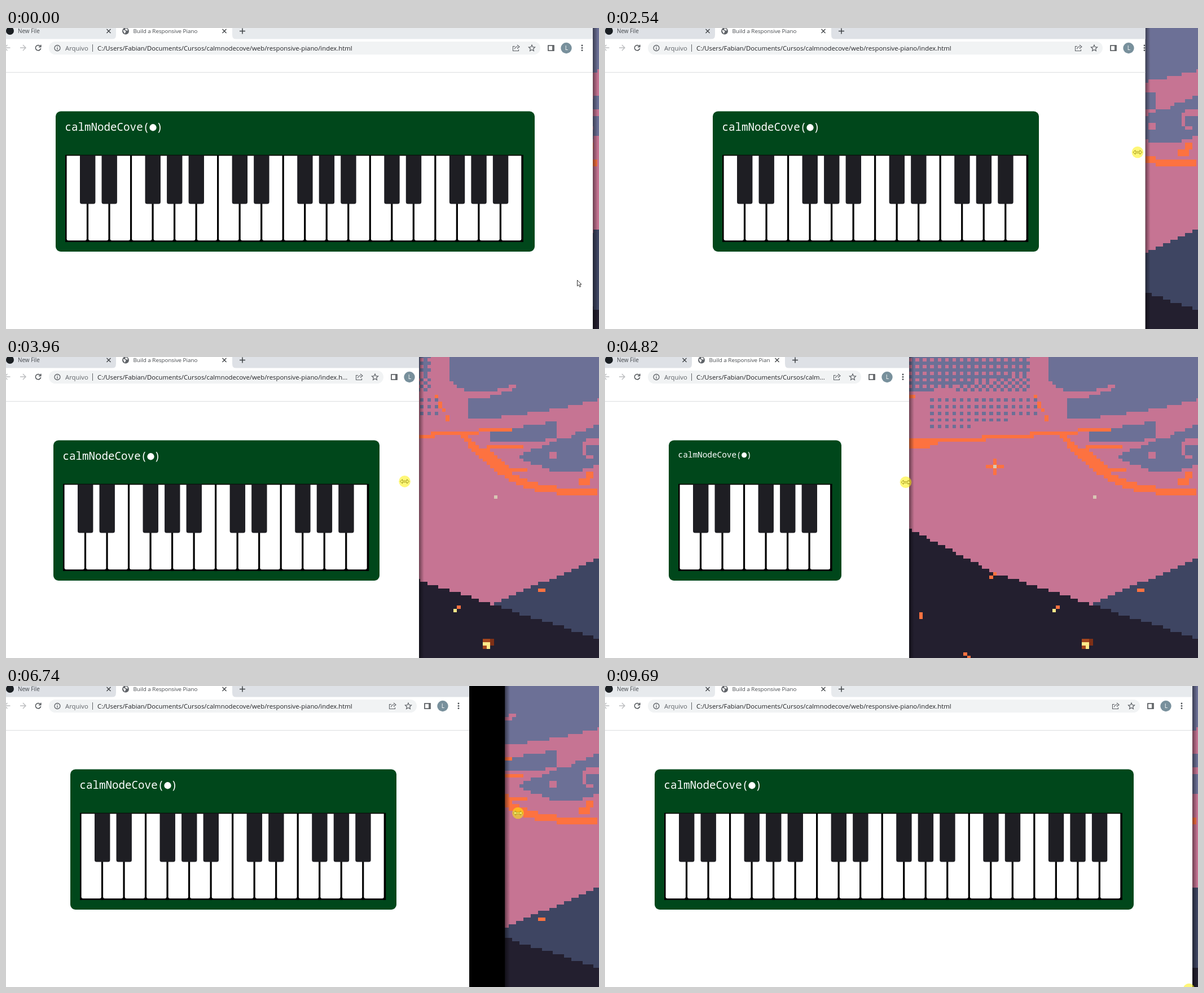
Write an HTML page with a canvas that moves like this. It is 1051x533 px and loops after 9.75 s.

```html
<!DOCTYPE html>
<html lang="en">
<head>
<meta charset="utf-8">
<title>Build a Responsive Piano</title>
<style>
html, body { margin: 0; width: 100%; height: 100%; overflow: hidden; background: #fff; }
canvas { display: block; }
</style>
</head>
<body>
<canvas id="stage" width="1051" height="533"></canvas>
<script>
const W = 1051, H = 533, LOOP = 9750;
const FOCUS = 1800, SHRUNK = 5280, GROWN = 7700, RELEASE = 8030, LEAVE = 8290, BLUR = 9690;
const SANS = '"Open Sans", "Noto Sans", sans-serif';
const MONO = '"Noto Sans Mono", "DejaVu Sans Mono", monospace';
const ADDRESS = 'C:/Users/Fabian/Documents/Cursos/calmnodecove/web/responsive-piano/index.html';
const ctx = document.getElementById('stage').getContext('2d');

// Motion: the pointer drags the window edge, edge and page follow with a delay
const DRAG = [[FOCUS, 1040], [1950, 1025], [3160, 859], [3770, 755], [4590, 547], [4820, 533], [SHRUNK, 519],
  [5620, 521], [6140, 754], [6240, 792], [7260, 1027], [7640, 1041]];

function grip(t) {
  const i = DRAG.findIndex(([time]) => t < time);
  if (i === 0) return DRAG[0][1];
  if (i < 0) return DRAG[DRAG.length - 1][1];
  const [t0, a] = DRAG[i - 1], [t1, b] = DRAG[i];
  return a + (b - a) * (t - t0) / (t1 - t0);
}
const edgeAt = t => grip(t - 100);
const pageAt = t => Math.round(t > GROWN ? edgeAt(t) : grip(t - (t < SHRUNK ? 230 : 376)));

function ease(p) {
  p = Math.max(0, Math.min(1, p));
  return p * p * (3 - 2 * p);
}

function rect(c, x, y, w, h) {
  ctx.fillStyle = c;
  ctx.fillRect(x, y, w, h);
}
function round(c, x, y, w, h, r) {
  ctx.fillStyle = c;
  ctx.beginPath();
  ctx.roundRect(x, y, w, h, r);
  ctx.fill();
}
function disc(c, x, y, r) {
  ctx.fillStyle = c;
  ctx.beginPath();
  ctx.arc(x, y, r, 0, 7);
  ctx.fill();
}
function shape(d, x, y, line, w, fill) {
  const path = new Path2D(d);
  ctx.save();
  ctx.translate(x, y);
  if (fill) {
    ctx.fillStyle = fill;
    ctx.fill(path);
  }
  if (line) {
    ctx.strokeStyle = line;
    ctx.lineWidth = w;
    ctx.stroke(path);
  }
  ctx.restore();
}
function text(s, x, y, size, c, family = SANS) {
  ctx.font = `${size}px ${family}`;
  ctx.fillStyle = c;
  ctx.fillText(s, x, y);
}

function makeWallpaper() {
  const CW = 6.55, CH = 5.917, TOP = 2;
  const PINK = '#c67493', PURPLE = '#6c7096', ORANGE = '#fd7240', NAVY = '#3e4562', DARK = '#231f2f';
  const PALE = '#d8c7b4', YELLOW = '#fde98a';
  const el = document.createElement('canvas');
  el.width = W;
  el.height = H;
  const g = el.getContext('2d');

  const cell = (c, i, j, w = 1, h = 1) => {
    const x = Math.round(i * CW), y = Math.round(TOP + j * CH);
    g.fillStyle = c;
    g.fillRect(x, y, Math.round((i + w) * CW) - x, Math.round(TOP + (j + h) * CH) - y);
  };
  // Fills every cell whose centre passes the test
  const paint = (c, test) => {
    for (let j = -1; j * CH < H; j++) for (let i = 0; i * CW < W; i++) {
      if (test((i + .5) * CW, TOP + (j + .5) * CH, i, j)) cell(c, i, j);
    }
  };
  const past = (x, from) => Math.max(0, x - from);

  g.fillStyle = PINK;
  g.fillRect(0, 0, W, H);

  // Dithered sky: dense, checkered, sparse
  paint(PURPLE, (x, y, i, j) => {
    const even = i % 2 === 0 && j % 2 === 0;
    if (x < 755 && y < 64 - .17 * past(x, 550)) return !even;
    if (x > 620 && x < 755 && y < 63) return (i + j) % 2 === 0;
    return even && x > 574 && x < 768 && y > 68 && y < 127 - .2 * past(x, 635);
  });

  // Upper cloud with a pink streak
  paint(PURPLE, (x, y) => {
    const d = x - 860;
    const top = 62 - .016 * past(825, x) ** 2 - .3 * past(x, 860);
    const bottom = 75 - .33 * past(x, 845);
    const streak = x < 905 && y > top && y < bottom;
    return x > 786 && y < 107 - .08 * d - .00047 * d * d && !streak && !(x < 819 && y > 75);
  });

  // Lower cloud
  paint(PURPLE, (x, y) => {
    const d = x - 911;
    if (x < 860 || y < 133 - .165 * (x - 860)) return false;
    if (x < 976 && y < 152 - .07 * past(x, 885)) return true;
    return d > 0 && y > 172 - .37 * d && y < Math.min(203, 180 + .4 * d) - .3 * past(x, 1010);
  });
  cell(PINK, 150, 22, 4);
  cell(PINK, 152, 21, 1, 3);
  cell(PINK, 147, 28, 2, 2);
  cell(PINK, 157, 24, 4, 2);
  cell(PINK, 156, 25, 1, 4);
  cell(PINK, 157, 29, 2);

  // Sunlit rim
  paint(ORANGE, (x, y) => x < 900 && Math.abs(y - 153.5 + .0705 * (x - 537)) < (x < 582 ? 8 : 3.1));
  paint(ORANGE, (x, y) => {
    const low = 244 - 104 * ((W - x) / 245) ** 3.2;
    const thick = 12 + 20 * Math.exp(-(((x - 865) / 28) ** 2));
    return x > 806 && y < low && y > low - thick;
  });
  cell(ORANGE, 130, 26, 10);
  cell(ORANGE, 136, 33, 5);
  cell(ORANGE, 157, 34, 2, 2);
  cell(ORANGE, 155, 36, 3, 2);
  cell(ORANGE, 82, 11, 2);
  for (let k = 0; k < 4; k++) cell(ORANGE, 116 + k, 11 + 2 * k, 1, 1 + k % 2);

  // Star
  cell(ORANGE, 105, 30, 1, 5);
  cell(ORANGE, 103, 32, 5);
  cell(PALE, 105, 32);
  cell(PALE, 132, 41);

  // Hills
  paint(NAVY, (x, y) => y > 432 - .421 * (x - 873));
  paint(DARK, (x, y) => y > Math.min(303 + .516 * (x - 537), 382 + .325 * (x - 690)));

  // Sparks and lantern
  cell(ORANGE, 144, 69, 2);
  cell(ORANGE, 85, 76, 1, 2);
  for (const [i, j] of [[104, 65], [105, 64], [122, 74], [97, 88], [98, 89]]) cell(ORANGE, i, j);
  cell(YELLOW, 121, 75);
  cell('#a5471f', 129, 84, 2, 3);
  cell('#7f3016', 131, 84, 1, 2);
  cell(YELLOW, 129, 85, 2);
  cell(YELLOW, 130, 86);
  return el;
}
const wallpaper = makeWallpaper();

const cross = x => shape('M-3.5 -3.5L3.5 3.5M3.5 -3.5L-3.5 3.5', x, 5.5, '#3c4043', 1.3);

function tabs(page, focused) {
  const tw = Math.min(205, (page - 219) / 2), end = 2 * tw - 9;
  rect(focused ? '#dee1e6' : '#e7eaed', 0, 0, page, 19.5);
  shape(`M${tw - 17} 20Q${tw - 10} 20 ${tw - 10} 12V0H${end}V12Q${end} 20 ${end + 7} 20Z`, 0, 0, null, 0, '#fff');
  disc('#1b1f23', 7, 5, 7);
  text('New File', 21, 9, 9.95, '#45494d');
  cross(tw - 23);

  disc('#5f6368', tw + 7, 5.5, 6);
  shape('M-4.5 3.5l3 .5 2 2 -1 2 -1 2 -2 -3zM0 .5l3 1 1 3 -3 0 -2 -2z', tw + 7, 0, null, 0, '#fff');
  ctx.save();
  ctx.beginPath();
  ctx.rect(0, 0, end - 27, 20);
  ctx.clip();
  text('Build a Responsive Piano', tw + 20.5, 9, 9.8, '#45494d');
  ctx.restore();
  cross(end - 14);
  shape('M-5 0H5M0 -5V5', end + 18, 5.5, '#3c4043', 1.5);
}

function toolbar(page) {
  const INK = '#5f6368', DIM = '#babcbe', DEEP = '#4a4e52';
  shape('M-5 0H5M0 -5L-5 0L0 5', 2.5, 35, DIM, 1.4);
  shape('M-5 0H5M0 -5L5 0L0 5', 30, 35, DIM, 1.4);
  shape('M3.6 -3A4.7 4.7 0 1 0 4.7 1M4.8 -5.2V-1.4H1', 57, 35, DEEP, 1.5);

  round('#f1f3f4', 76, 24, page - 169, 23, 11.5);
  shape('M-5 0A5 5 0 1 1 5 0A5 5 0 1 1 -5 0M0 -.7V3M0 -3V-1.7', 91, 35.5, INK, 1.3);
  text('Arquivo', 105, 39.5, 11.35, INK);
  rect(INK, 153, 29, 1, 13);

  let s = ADDRESS;
  for (let n = s.length; ctx.measureText(s).width > page - 315 && n > 1; n--) s = ADDRESS.slice(0, n) + '...';
  text(s, 162, 39.5, 11.35, '#202124');

  shape('M-2 -3H-5.5V5H4.5V2.5M-2.5 2Q-2 -2.5 3 -2.5M2 -5.5L6 -2.3L2 1', page - 136, 35.5, INK, 1.1);
  shape('M0 -5.5L1.6 -1.8L5.5 -1.5L2.6 1.2L3.4 5L0 3L-3.4 5L-2.6 1.2L-5.5 -1.5L-1.6 -1.8Z', page - 108, 35.5, INK, 1.2);
  shape('M-5 -4.5H5V4.5H-5ZM3 -4.5V4.5', page - 74, 35.5, DEEP, 1.6);
  disc('#78909c', page - 47, 35.5, 9.7);
  text('L', page - 49.3, 39.3, 10.3, '#fff');
  for (let k = -1; k < 2; k++) disc(DEEP, page - 19, 35.3 + 4.3 * k, 1.4);
  rect('#dcdee0', 0, 78, page, 1);
}

function piano(page) {
  const PITCH = 38.52;
  const size = page > 1011 ? 3 : page > 642 ? 2 : 1;
  const width = [306, 578, 849][size - 1];
  const x = Math.floor((page - 15 - width) / 2);
  const kx = x + 17, count = size * 7;
  round('#00471b', x, 147.5, width, 248.5, 9);

  const em = size > 1 ? 19.2 : 14.4, adv = em * .6, base = size > 1 ? 182 : 178;
  text('calmNodeCove(', kx - .5, base, em, '#fff', MONO);
  text(')', kx + adv * 14, base, em, '#fff', MONO);
  disc('#fff', kx + adv * 13.5, base - em * .3, em * .32);

  rect('#000', kx, 224.7, count * PITCH + 3, 154.3);
  for (let i = 0; i < count; i++) round('#fff', kx + 2.6 + i * PITCH, 226.3, 35.3, 150, [0, 0, 3, 3]);
  for (let i = 0; i < count; i++) {
    if (i % 7 !== 2 && i % 7 !== 6) round('#1e1e23', kx + 26 + i * PITCH, 225.5, 27.4, 86, [0, 0, 3.5, 3.5]);
  }
}

function mouse(t) {
  const resizing = t >= 1410 && t < LEAVE;
  let x = grip(t), y = 219 + 7 * Math.min(1, Math.abs(t - 3160) / 4200);
  if (!resizing) {
    const leaving = t >= LEAVE;
    const p = ease(leaving ? (t - LEAVE) / 920 : (t - 70) / 880);
    const bow = Math.sin(Math.PI * p);
    x = leaving ? 1031 + 4 * p - 9 * bow : 1012 + 25 * p - 36 * bow;
    y = leaving ? 226 + 311 * p : 446 - 227 * p;
  }
  const glyph = resizing
    ? 'M-8 0L-4 -3.7V-1.2H4V-3.7L8 0L4 3.7V1.2H-4V3.7Z'
    : 'M.5 .5V11L3 8.7L4.8 12.6L6.6 11.8L4.9 8H8Z';
  shape(glyph, x, y, '#222', .9, '#fff');
  if (t >= FOCUS && t < RELEASE || t >= BLUR) disc('rgba(255,240,10,.55)', x, y, 10.3);
}

function draw(t) {
  const page = pageAt(t), edge = edgeAt(t);
  ctx.drawImage(wallpaper, 0, 0);
  const shade = ctx.createLinearGradient(edge, 0, edge + 9, 0);
  shade.addColorStop(0, 'rgba(0,0,0,.45)');
  shade.addColorStop(1, 'rgba(0,0,0,0)');
  rect(shade, edge, 0, 9, H);
  rect('#000', 0, 0, edge, H);

  ctx.save();
  ctx.beginPath();
  ctx.rect(0, 0, Math.min(page, edge), H);
  ctx.clip();
  rect('#fff', 0, 0, page, H);
  tabs(page, t >= FOCUS && t < BLUR);
  toolbar(page);
  piano(page);
  ctx.restore();
  mouse(t);
}

const start = performance.now();
function tick() {
  draw((performance.now() - start) % LOOP);
  requestAnimationFrame(tick);
}
tick();
</script>
</body>
</html>
```
